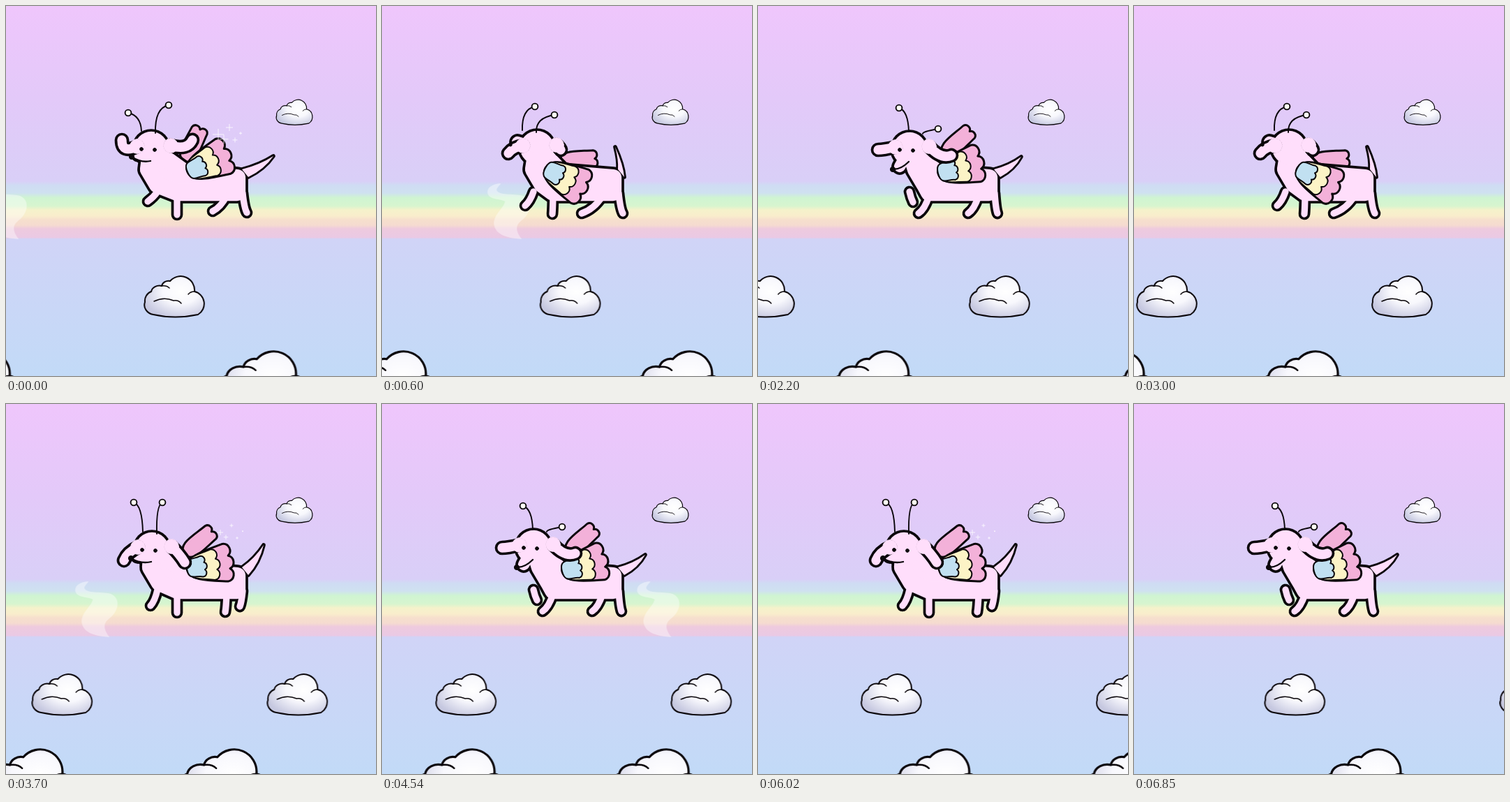
Recreate the animation shown at these times as an HTML page. Size 530 by 530 pixels, loop 6950 ms.

```html
<!DOCTYPE html>
<html lang="en">
<head>
<meta charset="utf-8">
<title>Winged puppy over the rainbow</title>
<style>
  html, body { margin: 0; width: 100%; height: 100%; overflow: hidden; }
  svg { display: block; width: 100vw; height: 100vh; }
  :root { --loop: 6950ms; --stride: calc(var(--loop) / 6); }
  .mid { animation: mid var(--loop) linear infinite; }
  .low { animation: low var(--loop) linear infinite; }
  .swirl { animation: swirl var(--loop) linear infinite; }
  .pose {
    visibility: hidden;
    animation: show var(--stride) step-end infinite;
    animation-delay: calc((var(--i) - 8) * var(--stride) / 8 - 15ms);
  }
  @keyframes mid { to { transform: translateX(331px); } }
  @keyframes low { to { transform: translateX(664px); } }
  @keyframes swirl {
    0% { transform: translate(-32px, 254px); }
    27.05%, 45.69% { transform: translate(538px, 254px); }
    45.7% { transform: translate(-68px, 254px); }
    73.22%, 100% { transform: translate(538px, 254px); }
  }
  @keyframes show {
    0% { visibility: visible; }
    12.5%, 100% { visibility: hidden; }
  }
  .line { fill: none; stroke: #0b070b; }
  .line, .ink, .fur { stroke-linecap: round; stroke-linejoin: round; }
  .ink { fill: #0b070b; stroke: #0b070b; }
  .fur { fill: #ffdefb; stroke: #ffdefb; }
  .open { fill: none; }
  .pink { fill: #f3b1d9; stroke-width: 3; }
  .yellow { fill: #fcf3c6; stroke-width: 2; }
  .blue { fill: #c1e0f1; stroke-width: 2; }
  .thin { stroke-width: 1.9; }
  .bulb { fill: #fffdf4; stroke-width: 1.9; }
  .mouth { stroke-width: 2.3; }
  .star { stroke: #fff; stroke-width: 1; opacity: .8; }
</style>
</head>
<body>
<svg viewBox="0 0 530 530" preserveAspectRatio="none">
  <defs>
    <linearGradient id="sky" x2="0" y2="1">
      <stop offset="0" stop-color="#efc6fc"/>
      <stop offset=".25" stop-color="#e3c9f9"/>
      <stop offset=".47" stop-color="#d9cff7"/>
      <stop offset=".64" stop-color="#d0d4f7"/>
      <stop offset="1" stop-color="#c2daf7"/>
    </linearGradient>
    <linearGradient id="bow" x2="0" y2="1">
      <stop offset="0" stop-color="#cfdcf3" stop-opacity="0"/>
      <stop offset=".07" stop-color="#cfdcf3"/>
      <stop offset=".2" stop-color="#cfe1f0"/>
      <stop offset=".28" stop-color="#cff4d2"/>
      <stop offset=".42" stop-color="#d7f5cf"/>
      <stop offset=".49" stop-color="#f5f2cb"/>
      <stop offset=".59" stop-color="#f9edcc"/>
      <stop offset=".66" stop-color="#f6dfcd"/>
      <stop offset=".75" stop-color="#f5dbd0"/>
      <stop offset=".81" stop-color="#eecade"/>
      <stop offset=".96" stop-color="#eac9e4"/>
      <stop offset="1" stop-color="#d0d4f7" stop-opacity="0"/>
    </linearGradient>
    <radialGradient id="puff" cx=".6" cy=".38" r=".66">
      <stop offset="0" stop-color="#fff"/>
      <stop offset=".45" stop-color="#f8f8fd"/>
      <stop offset="1" stop-color="#c6c8e0"/>
    </radialGradient>
    <g id="cloud" class="line" stroke-width="2">
      <path fill="url(#puff)" d="M1 38A14 14 0 0 1 10 23A12 10 0 0 1 25 15A10 9 0 0 1 37 8A20 20 0 0 1 72 23A18 18 0 0 1 77 56Q44 63 13 56A16 14 0 0 1 1 38Z"/>
      <path stroke-width="1.5" d="M14 37Q28 30 42 36Q49 35 53 40M25 15Q32 14 36 18M72 23Q66 23 63 27"/>
    </g>
  </defs>
  <rect width="530" height="530" fill="url(#sky)"/>
  <rect y="251" width="530" height="84" fill="url(#bow)"/>
  <use href="#cloud" transform="translate(387 133.5) scale(.605 .62)"/>
  <g class="mid">
    <use href="#cloud" x="198" y="386"/>
    <use href="#cloud" x="-139" y="386"/>
  </g>
  <g class="low">
    <use href="#cloud" transform="translate(300 493) scale(1.6)"/>
    <use href="#cloud" transform="translate(-110 493) scale(1.6)"/>
    <use href="#cloud" transform="translate(-388 493) scale(1.6)"/>
  </g>
  <path class="swirl" fill="#fff" opacity=".42" d="M20 0C5 1 0 8 1 14C3 24 20 22 26 26C24 36 10 44 10 58C12 72 24 78 50 80C44 72 38 62 50 53C64 42 66 24 52 18C36 14 18 18 14 10C14 6 18 4 20 0Z"/>
  <g id="dog"></g>
</svg>
<script>
// Key joints of each pose; wings are x, y and direction in degrees, ears are bend and tip.
const front = {
  head: [208, 204], chest: 204, nose: [180, 216], turn: -14, tail: [383, 215],
  feet: [[203, 280], [245, 299], [296, 294], [345, 296]],
  ears: [[[166, 212], [166, 192]], [[260, 207], [267, 192]]],
  bulbs: [[175, 153], [233, 142]], wing: [260, 238, -24], farWing: [256, 222, -64]
};
const side = {
  head: [209, 208], chest: 207, nose: [179, 221], turn: -13, tail: [369, 202],
  feet: [[207, 289], [245, 299], [314, 298], [335, 290]],
  ears: [[[174, 212], [169, 224]], [[248, 214], [256, 227]]],
  bulbs: [[183, 141], [224, 141]], wing: [259, 236, -9], farWing: [256, 215, -40]
};
const away = {
  head: [222, 203], chest: 217, nose: [184, 199], turn: -21, tail: [334, 202],
  feet: [[205, 286], [244, 298], [286, 297], [345, 297]],
  ears: [[[188, 202], [181, 211]], [[253, 200], [256, 206]]],
  bulbs: [[219, 144], [247, 156]], wing: [234, 232, 28], farWing: [255, 223, -5]
};
const toward = {
  head: [217, 205], chest: 226, nose: [193, 234], turn: -1, tail: [377, 216],
  feet: [[222, 281], [230, 297], [301, 297], [343, 297]],
  ears: [[[180, 206], [172, 206]], [[262, 220], [277, 214]]],
  bulbs: [[202, 146], [258, 176]], wing: [258, 240, -15], farWing: [266, 213, -42]
};
const hips = [[217, 266], [245, 272], [316, 272], [339, 268]];
const OUTLINE = 3.7;

const mix = (a, b, w) => Array.isArray(a) ? a.map((v, i) => mix(v, b[i], w)) : a + (b - a) * w;
const blend = (a, b, w) => Object.fromEntries(Object.keys(a).map(k => [k, mix(a[k], b[k], w)]));
const add = ([x, y], dx, dy) => [x + dx, y + dy];
const polar = ([x, y], r, deg) => {
  const t = deg * Math.PI / 180;
  return [x + r * Math.cos(t), y + r * Math.sin(t)].map(v => +v.toFixed(1));
};
const bend = (a, ctrl, b) => `M${a}Q${ctrl} ${b}`;
const line = (cls, d) => `<path class="line ${cls}" d="${d}"/>`;
const disc = (cls, [x, y], r) => `<circle class="${cls}" cx="${x}" cy="${y}" r="${r}"/>`;

// Thick strokes in ink, then slightly thinner in fur, merge into one outlined shape.
function outlined(parts) {
  const layer = (cls, grow) => parts.map(([d, width, open]) =>
    `<path class="${cls}${open ? " open" : ""}" d="${d}" stroke-width="${Math.max(0, width + grow)}"/>`).join("");
  return layer("ink", OUTLINE) + layer("fur", -OUTLINE);
}

function body(p) {
  const torso = `M${[p.head, [p.chest, 234], [p.chest + 13, 256], [245, 267], [331, 267], [331, 246], [258, 240]].join("L")}Z`;
  const top = [338, 234], under = [347, 245];
  const tail = `M${top}Q${add(mix(top, p.tail, .5), 3, 3)} ${p.tail}Q${add(mix(under, p.tail, .5), 5, 4)} ${under}Z`;
  const legs = p.feet.map((foot, i) =>
    [bend(hips[i], [mix(hips[i][0], foot[0], .4), foot[1] - 6], foot), 13, true]);
  const snout = `M${p.head}L${add(p.nose, 10, -4)}`;
  return outlined([[torso, 28], [`M${p.head}h.01`, 52], [snout, 20], [tail, 2], ...legs]);
}

function ear(root, [ctrl, tip]) {
  const width = 17;
  return outlined([[bend(root, ctrl, tip), width, true]]) + disc("fur", root, (width + OUTLINE) / 2);
}

// A rounded base opening into an arc of equal lobes.
function fan(cls, [x, y, dir], len, spread, lobes) {
  const base = [x, y];
  const round = s => polar(base, 18, dir + 90 * s);
  const edge = s => polar(base, len * .6, dir + s * (spread / 2 + 10));
  const rim = k => polar(base, len, dir + spread * (k / lobes - .5));
  const r = len * spread * Math.PI / 180 / lobes * .53;
  let d = `M${base}C${round(-1)} ${edge(-1)} ${rim(0)}`;
  for (let k = 1; k <= lobes; k++) d += `A${r} ${r} 0 0 1 ${rim(k)}`;
  return line(cls, `${d}C${edge(1)} ${round(1)} ${base}Z`);
}

function wing(at) {
  const layers = { pink: 1, yellow: .7, blue: .42 };
  return Object.entries(layers).map(([cls, f]) => fan(cls, at, 62 * f, 52 * (1.6 - .6 * f), 3)).join("");
}

function antenna(bulb, base) {
  return line("thin", bend(base, [base[0] - 1, bulb[1] + 4], bulb)) + disc("line bulb", bulb, 4.4);
}

function face(p) {
  const end = add(p.head, -1, 18);
  return line("mouth", bend(p.nose, add(mix(p.nose, end, .5), 0, 6), end))
    + disc("ink", add(p.head, -14, 1), 2.4) + disc("ink", add(p.head, 5, 2), 2.4);
}

function sparkles(step) {
  let s = "";
  for (let k = 0; k < 5; k++) {
    const r = (8 - 1.5 * k) / (1 + step);
    const x = 304 + 8 * k + 3 * step, y = 184 + 10 * Math.sin(2.4 * k);
    s += `<path class="star" d="M${x} ${y - r}v${2 * r}M${x - r} ${y}h${2 * r}"/>`;
  }
  return s;
}

function drawDog(p, step, facing) {
  return fan("pink", p.farWing, 50, 28, 2) + body(p) + wing(p.wing)
    + ear(add(p.head, -20, -3), p.ears[0]) + ear(add(p.head, 28, -4), p.ears[1])
    + p.bulbs.map((b, i) => antenna(b, add(p.head, p.turn + 20 * i, 3 * i - 25))).join("")
    + (facing ? face(p) : "") + disc("ink", p.nose, facing ? 3.6 : 2)
    + (step < 3 ? sparkles(step) : "");
}

const steps = [
  [front, front, 0], [side, side, 0], [side, away, 1 / 3], [side, away, 2 / 3],
  [away, away, 0], [away, toward, 1 / 3], [away, toward, 2 / 3], [toward, toward, 0]
];

document.getElementById("dog").innerHTML = steps.map(([a, b, w], i) =>
  `<g class="pose" style="--i:${i}">${drawDog(blend(a, b, w), i, i < 3 || i > 5)}</g>`).join("");
</script>
</body>
</html>
```
